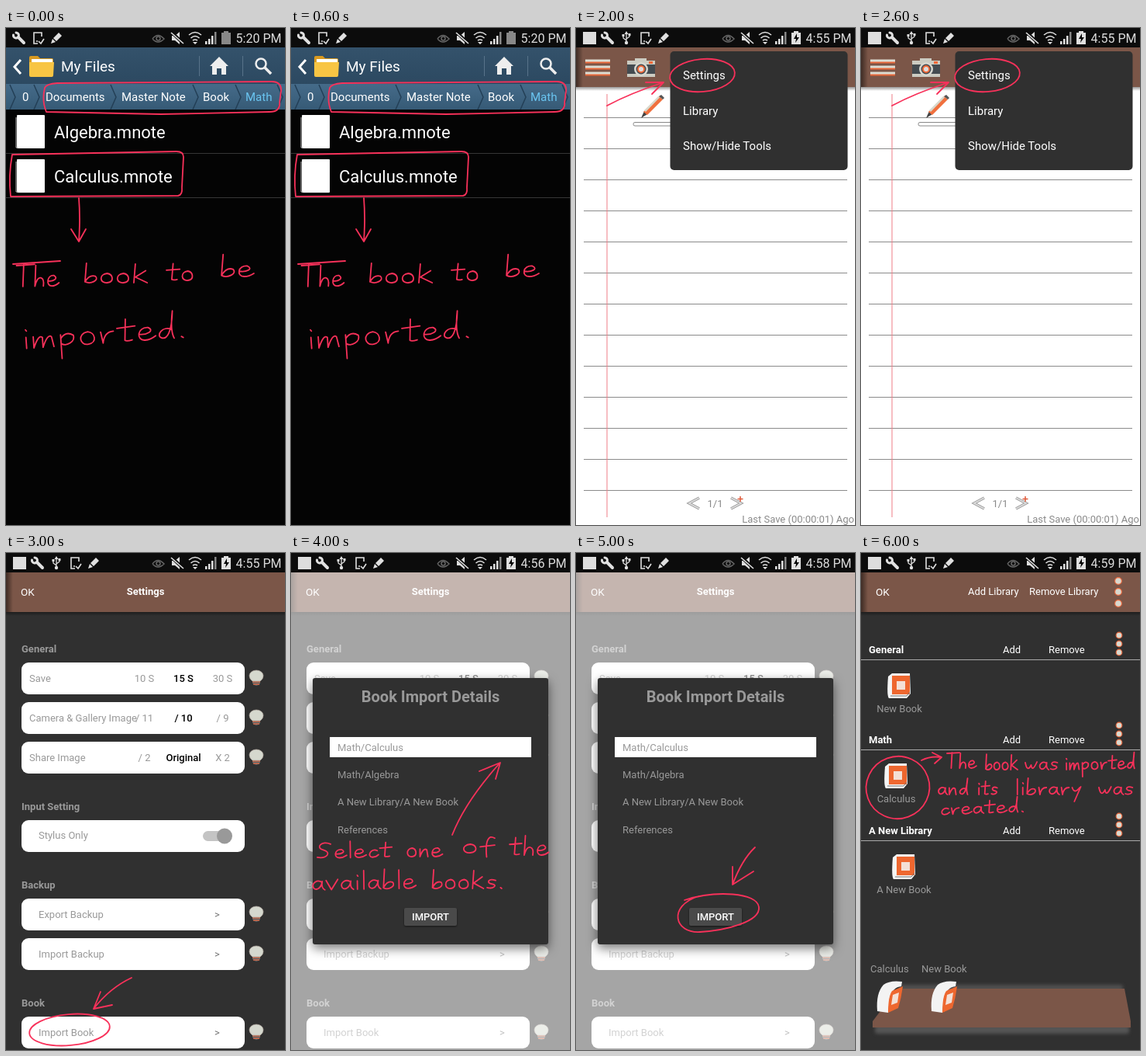
An HTML page that plays this animation: 360x640 px, repeating every 7 s.

```html
<!DOCTYPE html>
<html lang="en">
<head>
<meta charset="utf-8">
<title>Importing a book</title>
<style>
  html, body { margin: 0; width: 100%; height: 100%; overflow: hidden; background: #000; }
  svg { display: block; width: 360px; height: 640px; font: 13px Roboto, sans-serif; }
  .ink { fill: none; stroke: #f8315a; stroke-width: 1.8; stroke-linecap: round; stroke-linejoin: round; }
  .ink path { vector-effect: non-scaling-stroke; }
  .line { fill: none; stroke: #e0e0e0; stroke-width: 1.6; }
  .dialog { filter: drop-shadow(0 5px 7px #0008); }
  .soft { filter: blur(2px); }
</style>
</head>
<body>
<svg id="stage" viewBox="0 0 360 640">
  <defs>
    <linearGradient id="navy" x2="0" y2="1"><stop stop-color="#34526b"/><stop offset="1" stop-color="#2c4961"/></linearGradient>
    <linearGradient id="steel" x2="0" y2="1"><stop stop-color="#456b89"/><stop offset="1" stop-color="#365a76"/></linearGradient>
    <linearGradient id="edge"><stop stop-color="#000" stop-opacity=".5"/><stop offset="1" stop-color="#000" stop-opacity="0"/></linearGradient>
    <linearGradient id="below" x2="0" y2="1"><stop stop-color="#000" stop-opacity=".4"/><stop offset="1" stop-color="#000" stop-opacity="0"/></linearGradient>

    <g id="badge"><rect x="-8" y="-8" width="17" height="16" fill="#ddd"/></g>
    <g id="wrench" class="line" stroke-linecap="round"><path d="M-4-7A3.5 3.5 0 1 1-7.5-4" stroke-width="3"/><path d="M-1-1L6 6" style="stroke-width:4"/></g>
    <g id="usb" class="line"><path d="M0 6V-6M0 3L-4 0V-3M0 1L4-2V-4" style="stroke-width:1.3"/><path d="M0-9L2.5-5H-2.5ZM-5.500-5h3v3h-3zM2.500-6h3v3h-3z" fill="#e0e0e0" stroke="none"/><circle cy="6" r="2.200" fill="#e0e0e0" stroke="none"/></g>
    <g id="tablet" class="line"><path d="M5-2V-7H-5V7H0M-2 4H0M1 4L4 7L8 1"/></g>
    <g id="pen"><path d="M-7 7L-5 1L-1 5ZM-4 0L3-7L7-3L0 4Z" fill="#e0e0e0"/></g>

    <g id="camera">
      <path d="M66 42h36v21H66zM76 39h15v4H76z" fill="#ccccc2"/><path d="M66 47h36v12H66z" fill="#444b50"/>
      <circle cx="84" cy="53" r="9" fill="#d8d8d0"/><circle cx="84" cy="53" r="6.500" fill="#444b50"/>
      <circle cx="84" cy="53" r="4" fill="#ddd" stroke="#f26a38" stroke-width="2"/><path d="M94 43h5v3h-5z" fill="#f26a38"/>
    </g>
    <g id="picture">
      <path d="M123 41h36v21h-36z" fill="#4a5054"/><path d="M124 62l10-13 6 7 6-9 12 15z" fill="#f0683a"/>
      <path d="M132 52l2-3 4 5-3 1zM143 51l3-4 4 6-4-1z" fill="#ddd"/><circle cx="153" cy="46" r="2.500" fill="#ddd"/>
    </g>
    <g id="undo">
      <path d="M205 51C213 50 216 55 212 62C222 56 222 43 206 42Z" fill="#ee6a3c"/>
      <path d="M195 47L207 37V42C220 42 222 53 215 61C217 53 213 50 207 51V57Z" fill="#d9d9cf"/>
    </g>
    <g id="menu"><path d="M12 44h32M12 52h32M12 60h32" stroke="#e8683a" stroke-width="3"/><path d="M12 42h32M12 50h32M12 58h32" stroke="#dcdcd2" stroke-width="3"/></g>
    <g id="pencil">
      <path d="M84 116l4-9 4 4z" fill="#444"/><path d="M87 108L107 88l5 4L92 112z" fill="#f0703e"/>
      <path d="M88 106l18-18 2 1.500L90 108z" fill="#d8d8cc"/><path d="M107 88l3-2 4 4-2 2z" fill="#555"/>
    </g>
    <g id="bulb">
      <path d="M-5 3h10v4q-5 6-10 0z" fill="#55666b"/><path d="M-5 5H5M-4 8H4" stroke="#d86a48" stroke-width="1.300"/>
      <path d="M-5 4Q-9 1-9-3A9 7 0 0 1 9-3Q9 1 5 4Z" fill="#d5d8ce" stroke="#b0a79e" stroke-width=".7"/>
    </g>
    <g id="book">
      <path d="M-14-12l5-4H14l1 26-5 6H-13q-3-3-1-28z" fill="#f4f4f4"/><path d="M-9-13H14V11H-9z" fill="#ee672f"/>
      <path d="M-3-6H8V5H-3z" fill="#f4e0d6"/><path d="M-11 13H10l4-5" fill="none" stroke="#777"/>
    </g>
    <g id="standing">
      <path d="M-16 19Q-18-4-8-15Q0-21 16-19L15-13Q4-12 0 2L-2 21Z" fill="#f3f3f3"/>
      <path d="M-2 21Q-2 0 3-7L17-13Q15 2 11 15Z" fill="#ee672f"/><path d="M4-2l8-3-2 13-8 3z" fill="#f4e0d6"/>
    </g>
  </defs>
</svg>
<script>
const range = (n, f) => Array.from({ length: n }, (_, i) => f(i)).join('');
const use = (id, x = 0, y = 0) => `<use href="#${id}" x="${x}" y="${y}"/>`;
const rect = (x, y, w, h, fill, extra = '') => `<rect x="${x}" y="${y}" width="${w}" height="${h}" fill="${fill}" ${extra}/>`;
const text = (x, y, s, fill = '#fff', size = 13, extra = '') =>
  `<text x="${x}" y="${y}" fill="${fill}" font-size="${size}" ${extra}>${s}</text>`;
const MID = 'text-anchor="middle"', END = 'text-anchor="end"', BOLD = 'font-weight="bold"', MEDIUM = 'font-weight="500"';
const GREY = '#999';

// Handwriting: stroke letters on a baseline, x-height 10; [advance, path].
const letters = {
  a: [11, 'M8-8C4-12 0-7 1-3S7 0 8-9Q7-2 10 0'], b: [11, 'M2-21L1-1Q4-9 8-7C11-3 5 2 1-1'],
  c: [10, 'M8-8C3-12-1-1 4 0Q7 0 9-3'], d: [11, 'M8-7C3-11-1-3 2-1S8-5 9-22Q7-6 9 0'],
  e: [11, 'M1-5C5-4 10-7 6-10C0-11-1 0 4 0Q7 0 10-3'], f: [10, 'M9-17C5-22 3-13 4 5M0-7L9-9'],
  h: [11, 'M2-20L1 0Q3-9 6-8T8 0'], i: [5, 'M2-9L2 0M2-15L2.5-14'],
  k: [12, 'M2-20L1 0M9-13L2-6L10 0'], l: [5, 'M2-20L2 0'],
  m: [15, 'M1-9L1 0Q4-11 6-8L6 0Q9-11 11-8L12 0'], n: [11, 'M1-9L1 0Q4-11 7-8L8 0'],
  o: [11, 'M5-10C-1-9 0 1 5 0S9-9 5-10'], p: [11, 'M1-9L1 10M1-6Q4-12 8-8C9-3 4 1 1-2'],
  r: [10, 'M1-9L2 0Q3-9 8-9'], s: [10, 'M8-9C2-12 0-6 5-5S6 1 1-1'],
  t: [11, 'M5-18L4-1Q5 0 8-1M0-11L10-12'], v: [11, 'M0-10L4 0L9-11'],
  w: [14, 'M0-9Q2 4 6-6Q7 4 12-10'], y: [10, 'M1-9Q3 0 8-9M9-10L3 9'],
  S: [14, 'M11-17C4-22-2-13 5-10S8 1 0-1'], T: [14, 'M0-20L15-21M6-21L5 0'], '.': [5, 'M2-1L3 0'],
};
function hand(word, x, y, width, scale, tilt = 0) {
  let pen = 0;
  const strokes = [...word].map(ch => {
    const [advance, d] = letters[ch];
    const path = `<path d="${d}" transform="translate(${pen})"/>`;
    pen += advance;
    return path;
  }).join('');
  return `<g class="ink" transform="translate(${x} ${y}) rotate(${tilt}) scale(${width / pen} ${scale})">${strokes}</g>`;
}
const ink = d => `<path class="ink" d="${d}"/>`;
const ring = (x, y, rx, ry, tilt = 0) => `<ellipse class="ink" cx="${x}" cy="${y}" rx="${rx}" ry="${ry}" transform="rotate(${tilt} ${x} ${y})"/>`;

const status = (icons, time, charging = true) => rect(0, 0, 360, 25, '#0c0c0c')
  + icons.split(' ').map((id, i) => use(id, 17 + 24 * i, 13)).join('')
  + `<g fill="none" stroke="#666" stroke-width="1.5"><path d="M189 14Q196 5 204 14Q196 22 189 14"/><circle cx="196.500" cy="13.500" r="2.500"/></g>
    <path d="M214 10h4l6-5v16l-6-5h-4z" fill="#ddd"/><path d="M213 5L229 20" stroke="#0c0c0c" stroke-width="4"/>
    <path class="line" d="M213 6L229 20M236 9Q244 2 252 9M238.500 13Q244 8 249.500 13M241 16Q244 14 247 16"/>
    <path d="M241 18h6l-3 3zM257 17h2.500v4H257zM261 14h2.500v7H261zM265 10h2.500v11H265z" fill="#e0e0e0"/><path d="M269 5h2.500v16H269z" fill="#888"/>
    <path d="M278 6h3V4h6v2h3v15h-12z" fill="${charging ? '#e0e0e0' : '#888'}"/>`
  + (charging ? '<path d="M285 7l-4 7h3l-1 5 5-7h-3z" fill="#000"/>' : '')
  + text(355.5, 19, time + ' PM', '#ddd', 16, END);
const ICONS = 'badge wrench usb tablet pen';

const header = () => rect(0, 25, 360, 51, '#7b5648') + rect(0, 25, 9, 51, 'url(#edge)') + rect(0, 76, 360, 5, 'url(#below)');
const dots = (x, ys, r) => ys.map(y => `<circle cx="${x}" cy="${y}" r="${r}" fill="#d9d9cf" stroke="#ec6b40" stroke-width="1.2"/>`).join('');

const fileRow = (y, name) => rect(14, y + 7, 36, 43, '#fff', 'rx="1"') + `<path d="M13 ${y + 10}v39h3" fill="none" stroke="#bbb"/>`
  + text(62, y + 37, name, '#fff', 22) + rect(0, y + 56, 360, 1, '#363636');
const files = () => rect(0, 0, 360, 640, '#040404') + status('wrench tablet pen', '5:20', false)
  + rect(0, 25, 360, 47, 'url(#navy)') + rect(0, 72, 360, 33, 'url(#steel)')
  + `<path d="M19 41L11 50L19 59" fill="none" stroke="#fff" stroke-width="3"/>
    <path d="M30 38q0-2 2-2h9l3 3h15q2 0 2 2v20H30z" fill="#d99a20"/><path d="M33 40h27v8H33z" fill="#fff"/><path d="M30 44h32l-1 17q0 2-2 2H32q-2 0-2-2z" fill="#f8c544"/>
    <path d="M249.500 36v26M305.500 36v26" stroke="#58738a"/>
    <path d="M263 49L275 37l12 12h-3v11h-6v-8h-6v8h-6V49z" fill="#eee"/>
    <circle cx="329" cy="46" r="6.500" fill="none" stroke="#eee" stroke-width="2.500"/><path d="M334 51l8 8" stroke="#eee" stroke-width="3.500"/>`
  + [8, 39, 138, 244, 299, 353].map(x => `<path d="M${x - 3} 73l7 16l-7 16" fill="none" stroke="#233f56" stroke-width="1.500"/>`).join('')
  + [[21, '0'], [51, 'Documents'], [149, 'Master Note'], [254, 'Book']].map(([x, s]) => text(x, 94, s, '#fff', 15)).join('')
  + text(309, 94, 'Math', '#6ac4f0', 15) + text(71, 56, 'My Files', '#fff', 19)
  + fileRow(105, 'Algebra.mnote') + fileRow(162, 'Calculus.mnote')
  + ink('M50 77Q46 94 52 108L200 111L340 108Q354 108 353 96L355 80Q355 69 343 69L66 71Q52 72 50 77')
  + ink('M8 163Q3 190 6 217L222 216Q228 215 227 205L229 166Q229 159 220 159Z')
  + ink('M94 219Q96 245 94 275M84 259L94 275L103 259')
  + ink('M9 304L70 300') + hand('The', 14, 333, 56, 1.35, -1) + hand('book', 100, 328, 86, 1.2)
  + hand('to', 207, 325, 38, 1.2) + hand('be', 276, 320, 46, 1.35) + hand('imported.', 22, 413, 212, 1.6, -4);

const notebook = (icons, time) => rect(0, 0, 360, 640, '#fff') + header() + status(icons, time)
  + range(13, i => rect(10, 115 + 40 * i, 340, 1, '#8b8b8b')) + rect(39.5, 85, 1, 545, '#ef7f86')
  + use('menu') + use('camera') + use('picture') + use('undo')
  + '<use href="#undo" transform="translate(473) scale(-1 1)"/>' + use('pencil')
  + dots(332, [36, 50, 65], 4.4)
  + `<g stroke="#777" stroke-width=".8"><path d="M124 105L139 87l17 8-14 20-15-1z" fill="#4a5054"/><path d="M132 96l7-9 17 8-7 10z" fill="#f0683a"/><path d="M124 105l4-5 17 9-3 6h-14z" fill="#d8d8cc"/>
    <path d="M165 86l30 10-12 5 12 10-4 4-12-10-4 11z" fill="#ccccc2"/>
    <path d="M205 86h23v28h-23z" fill="#ccccc2"/><circle cx="227" cy="104" r="10" fill="#ccccc2"/><path d="M213 115L233 95" stroke="#ee6a3c"/></g>
    <path d="M247 115l3-11 6 6z" fill="#444b50"/><path d="M251 104L267 87q8 1 8 7L256 110z" fill="#4a5054"/><path d="M256 101L268 91l3 3-11 12z" fill="#f0683a"/><path d="M253 104l3-3 4 5-3 2z" fill="#ddd"/>`
  + rect(74, 121.5, 50, 4.5, '#fff', 'rx="2" stroke="#888"')
  + `<g fill="none" stroke="#999" stroke-width="3.500"><path d="M159 605L146 612L159 619M200 605L213 612L200 619"/><path d="M159 605L146 612L159 619M200 605L213 612L200 619" stroke="#ddd" stroke-width="1.800"/></g>
    <path d="M212 603v7M208.500 606.500h7" stroke="#e05a3a" stroke-width="1.500"/>`
  + text(179.5, 617, '1/1', '#888', 13, MID) + text(359, 637, 'Last Save (00:00:01) Ago', '#8a8a8a', 13, END);
const notebookMenu = () => notebook(ICONS, '4:55') + rect(121.5, 30, 229, 153, '#303030', 'rx="5"')
  + ['Settings', 'Library', 'Show/Hide Tools'].map((s, i) => text(138, 66 + 45.5 * i, s, '#fff', 15)).join('')
  + ring(163, 61, 42, 21, -5) + ink('M40 100Q70 84 113 70M90 70L113 70L98 85');

const card = y => rect(20, y, 288, 41, '#fff', 'rx="9"');
const choiceRow = (y, name, choices) => card(y) + text(30, y + 25, name, GREY)
  + choices.map((s, i) => text([178.5, 229, 279.5][i], y + 25, s, i === 1 ? '#000' : GREY, 13, MID + (i === 1 ? MEDIUM : ''))).join('')
  + use('bulb', 323, y + 20);
const linkRow = (y, name) => card(y) + text(42, y + 25, name, GREY) + text(269, y + 25, '&gt;', '#777') + use('bulb', 323, y + 20);
const settings = () => rect(0, 0, 360, 640, '#303030') + header()
  + text(19, 55, 'OK', '#fff', 13.5) + text(180, 54, 'Settings', '#fff', 13, MID + BOLD)
  + [[128, 'General'], [331, 'Input Setting'], [432, 'Backup'], [584, 'Book']].map(([y, s]) => text(20, y, s, GREY, 13, BOLD)).join('')
  + choiceRow(141, 'Save', ['10 S', '15 S', '30 S'])
  + choiceRow(192, 'Camera &amp; Gallery Image', ['/ 11', '/ 10', '/ 9'])
  + choiceRow(243, 'Share Image', ['/ 2', 'Original', 'X 2'])
  + card(344) + text(42, 368, 'Stylus Only', GREY) + rect(254, 358, 34, 13, '#c4c4c4', 'rx="6.5"')
  + '<circle cx="282" cy="364.500" r="10" fill="#999"/>'
  + linkRow(445, 'Export Backup') + linkRow(496, 'Import Backup') + linkRow(597, 'Import Book');
const importDialog = time => settings() + rect(0, 25, 360, 615, '#fff', 'opacity=".565"') + status(ICONS, time)
  + rect(28, 161, 304, 343, '#303030', 'rx="3" class="dialog"')
  + text(180, 192, 'Book Import Details', GREY, 20, MID + BOLD) + rect(50, 237, 260, 26, '#fff')
  + ['Math/Calculus', 'Math/Algebra', 'A New Library/A New Book', 'References']
    .map((s, i) => text(60, 255 + 35.2 * i, s, GREY)).join('')
  + rect(146, 457, 68, 23, '#4a4a4a', 'rx="2" style="filter:drop-shadow(0 1px 1px #0008)"')
  + text(180, 473, 'IMPORT', '#fff', 13, MID + MEDIUM);

const shelfSection = (y, name, bookX, bookName) =>
  text(10, y, name, '#fff', 13, BOLD) + text(183, y, 'Add') + text(242, y, 'Remove')
  + dots(333, [y - 23, y - 12, y - 1], 3.8) + rect(0, y + 8, 360, 1, '#aaa')
  + use('book', bookX, y + 42) + text(bookX + .5, y + 76, bookName, GREY, 13, MID);
const library = () => rect(0, 0, 360, 640, '#303030') + header() + status(ICONS, '4:59')
  + text(19, 55, 'OK', '#fff', 13.5) + text(138, 54, 'Add Library') + text(217, 54, 'Remove Library') + dots(332, [36, 50, 65], 4.4)
  + shelfSection(129, 'General', 49, 'New Book') + shelfSection(245, 'Math', 45, 'Calculus')
  + shelfSection(362, 'A New Library', 55, 'A New Book')
  + rect(50, 556, 288, 8, '#505050', 'rx="3" class="soft"') + rect(18, 608, 328, 11, '#555', 'rx="3" class="soft"')
  + '<path d="M47 561H340L348 603V611H15V603Z" fill="#7b5648"/>'
  + text(12, 540, 'Calculus', GREY) + text(78, 540, 'New Book', GREY) + use('standing', 37, 571) + use('standing', 107, 571)
  + ring(47.5, 302, 41, 40, -20) + ink('M78 267Q90 261 104 263M92 257L104 263L95 271')
  + hand('The', 111, 277, 39, .95) + hand('book', 160, 279, 44, .95) + hand('was', 212, 279, 44, 1)
  + hand('imported', 263, 279, 92, .95, -1)
  + hand('and', 99, 311, 41, .95) + hand('its', 150, 311, 28, .95) + hand('library', 199, 311, 86, 1)
  + hand('was', 307, 311, 46, 1) + hand('created.', 102, 337, 110, .9, -2);

const scenes = [
  files(),
  notebook('wrench usb tablet pen', '4:11') + ring(332, 49, 18, 30, 3) + ink('M286 150Q296 122 323 84M304 97L324 83L323 105'),
  notebookMenu(),
  settings() + status(ICONS, '4:55') + ring(82, 614, 52, 20, -5) + ink('M162 547Q134 560 113 587M122 565L113 587L137 582'),
  importDialog('4:56') + ink('M208 363Q225 320 269 271M243 281L270 270L264 291')
    + hand('Select', 34, 393, 98, 1.05, -1) + hand('one', 149, 391, 48, 1.1) + hand('of', 221, 386, 44, 1.1) + hand('the', 282, 389, 52, 1.25)
    + hand('available', 27, 434, 136, 1.2, -1) + hand('books.', 181, 432, 94, 1.15),
  importDialog('4:58') + ink('M158 442C118 455 127 490 160 488S238 475 236 456S180 434 140 447')
    + ink('M231 379Q214 395 202 427M202 404L202 427L229 410'),
  library(),
];

const stage = document.getElementById('stage');
stage.insertAdjacentHTML('beforeend', scenes.map(s => `<g class="scene" display="none">${s}</g>`).join(''));
const groups = [...stage.querySelectorAll('.scene')];
let shown = -1;
function tick() {
  const current = Math.floor(performance.now() / 1000) % scenes.length;
  if (current !== shown) {
    groups.forEach((g, i) => g.setAttribute('display', i === current ? 'inline' : 'none'));
    shown = current;
  }
  requestAnimationFrame(tick);
}
tick();
</script>
</body>
</html>
```
